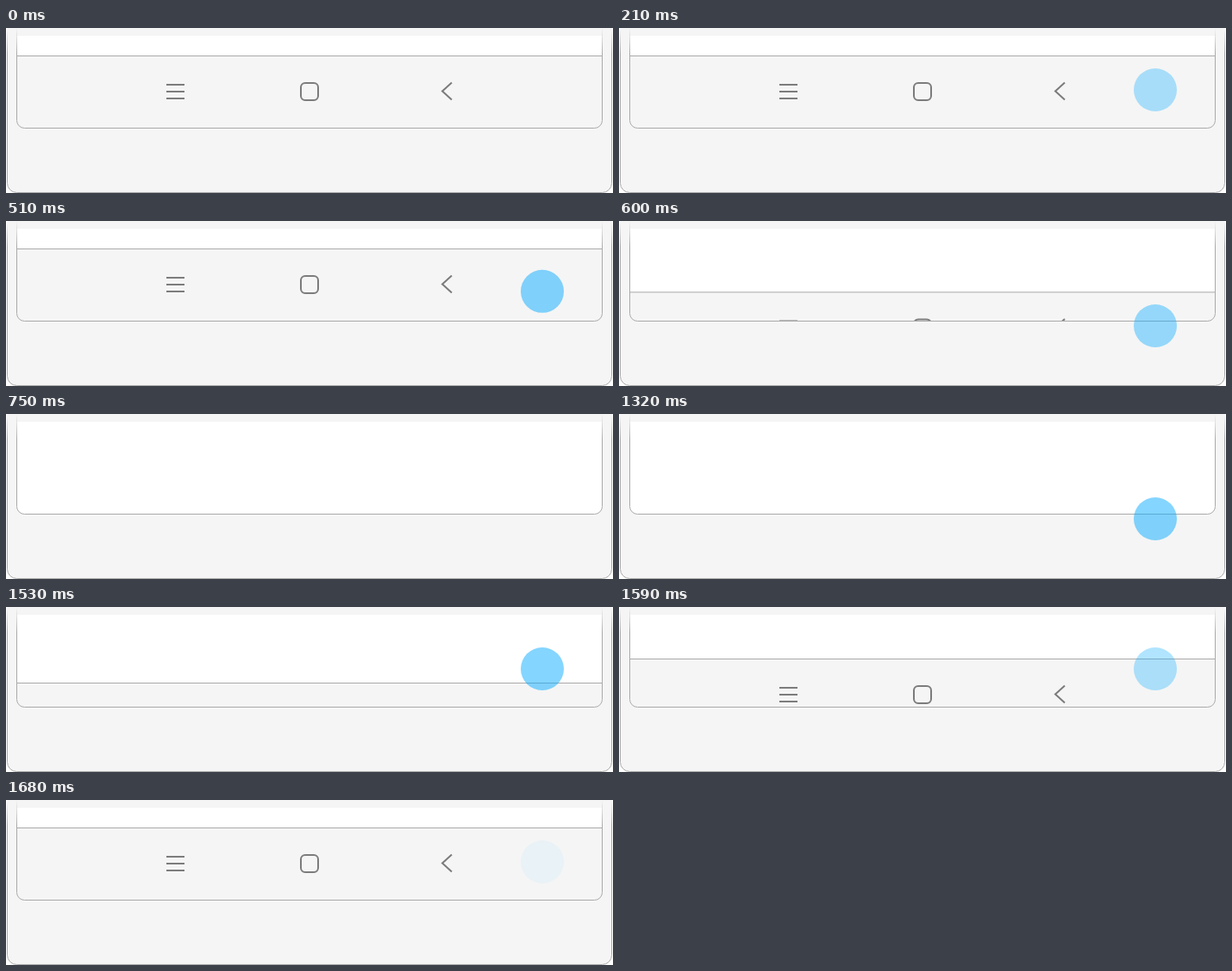
These frames come from a looping animation (704 px wide and 192 px high, 2.1 s). An HTML page:

```html
<!DOCTYPE html>
<html lang="en">
<head>
<meta charset="utf-8">
<title>Hiding the navigation bar</title>
<style>
  html, body { margin: 0; width: 100%; height: 100%; overflow: hidden; background: #fff; }
  svg { display: block; }
  .edge { fill: none; stroke: url(#fade); }
  .icon { fill: none; stroke: #7c7c7c; stroke-width: 2; }
</style>
</head>
<body>
<svg width="704" height="192" viewBox="0 0 704 192">
  <defs>
    <linearGradient id="fade" gradientUnits="userSpaceOnUse" x1="0" y1="0" x2="0" y2="30">
      <stop offset="0" stop-color="#aaa" stop-opacity="0"/>
      <stop offset="1" stop-color="#aaa"/>
    </linearGradient>
    <!-- rounded boxes that start above the stage -->
    <rect id="body" x="1.5" y="-20.5" width="701" height="212" rx="11"/>
    <rect id="screen" x="12.5" y="-20.5" width="679" height="137" rx="9"/>
    <clipPath id="inside"><use href="#screen"/></clipPath>
  </defs>

  <use href="#body" fill="#f5f5f5"/>
  <g clip-path="url(#inside)">
    <rect x="12" y="9" width="680" height="110" fill="#fff"/>
    <g id="bar">
      <rect x="12" y="32" width="680" height="90" fill="#f5f5f5"/>
      <path d="M12 32.5H692" stroke="#aaa"/>
      <path class="icon" d="M186 66h21m-21 8h21m-21 8h21"/>
      <rect class="icon" x="342" y="64" width="20" height="20" rx="5"/>
      <path class="icon" d="M517 63.5l-11 10l11 10"/>
    </g>
  </g>
  <use href="#body" class="edge"/>
  <use href="#screen" class="edge"/>
  <circle id="touch" cx="622" r="25" fill="#0aabff"/>
</svg>

<script>
const LOOP = 2100, STEP = 30, BAR_HEIGHT = 84;
const bar = document.getElementById('bar');
const touch = document.getElementById('touch');
const start = performance.now();

// 0 before `from`, 1 after `to`, linear between
const ramp = (t, from, to) => Math.min(1, Math.max(0, (t - from) / (to - from)));

function draw() {
  const elapsed = (performance.now() - start) % LOOP;
  const t = Math.floor(elapsed / STEP + 0.01) * STEP % LOOP;

  const drop = BAR_HEIGHT * (ramp(t, 510, 660) - ramp(t, 1470, 1650));
  const swipe = ramp(t, 488, 600) - ramp(t, 1440, 1530);
  const shown = ramp(t, 30, 300) - ramp(t, 570, 750)
              + ramp(t, 1178, 1320) - 0.9 * ramp(t, 1530, 1680);

  bar.setAttribute('transform', `translate(0 ${drop})`);
  bar.setAttribute('visibility', drop < BAR_HEIGHT ? 'visible' : 'hidden');
  touch.setAttribute('cy', 72 + 50 * swipe);
  touch.setAttribute('opacity', shown / 2);
  requestAnimationFrame(draw);
}
draw();
</script>
</body>
</html>
```
